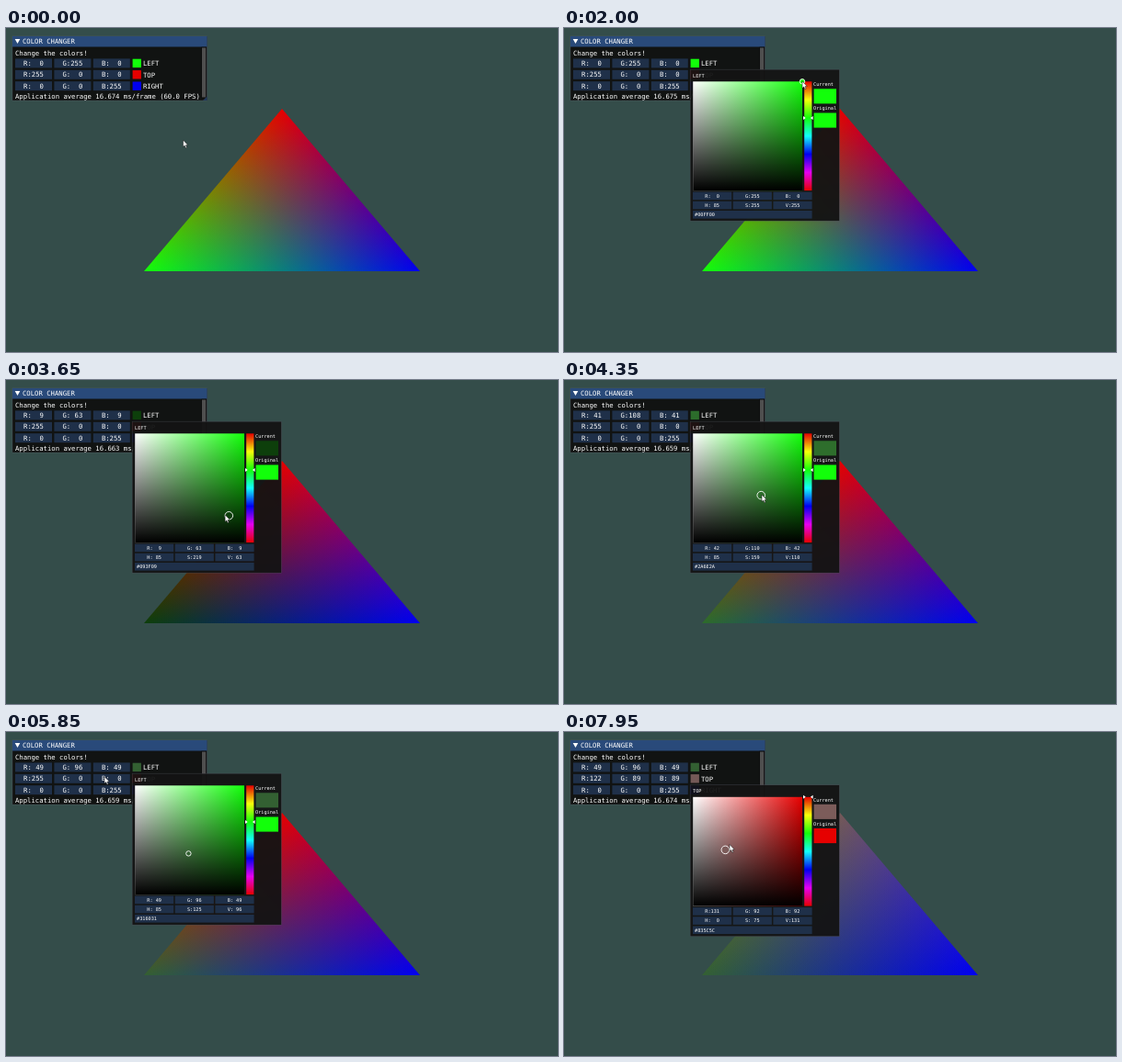
An HTML page with a canvas that plays this animation: 600x353 px, repeating every 8 s.

```html
<!DOCTYPE html>
<html lang="en">
<head>
<meta charset="utf-8">
<title>Color changer</title>
<style>
  html, body { margin: 0; width: 100%; height: 100%; overflow: hidden; background: #344d4a; }
  canvas { display: block; }
</style>
</head>
<body>
<canvas id="stage" width="600" height="353"></canvas>
<script>
const ctx = document.getElementById('stage').getContext('2d');
const LOOP = 8000;
const BIG = 7.26, SMALL = 5.22;
const FRAME_BG = '#1f3049', BORDER = 'rgba(110,110,128,.4)';
const SIDE = 118.8, SV_X = 140.2, SV_DY = 13.3;
const PICK_LAG = 75, LIST_LAG = 125;

// Pointer stops: arrival time, x, y, rest
const stops = [
  [0, 192.5, 122, 150],
  [600, 142, 39, 160],
  [1250, 211, 116.5],
  [1900, 259, 58, 600],
  [2700, 244, 69.5],
  [3100, 225, 110],
  [3450, 242.3, 147.8, 125],
  [3900, 212, 138],
  [4350, 215, 125],
  [4850, 228.7, 154.3, 120],
  [5280, 198.4, 132.4, 170],
  [5850, 107, 48.5],
  [6250, 141, 51, 200],
  [6950, 259, 70.5, 130],
  [7700, 167, 139],
  [7950, 180, 122.5]
];
const pointer = stops.flatMap(([t, x, y, rest]) => rest ? [[t, x, y], [t + rest, x, y]] : [[t, x, y]]);

const pickers = [
  { name: 'LEFT', top: 45, hue: 1 / 3, open: 720, close: 6080, press: 2500, release: 5400 },
  { name: 'TOP', top: 57.5, hue: 0, open: 6400, close: LOOP, press: 7080, release: LOOP }
];

const clamp = (v, a, b) => Math.min(b, Math.max(a, v));

// Cubic through the keys that never overshoots
function track(keys, t, axis) {
  let i = 0;
  while (i < keys.length - 2 && t >= keys[i + 1][0]) i++;
  const slope = k => (keys[k + 1][axis] - keys[k][axis]) / (keys[k + 1][0] - keys[k][0]);
  const tangent = k => {
    if (k === 0 || k === keys.length - 1) return slope(Math.min(k, keys.length - 2));
    const a = slope(k - 1), b = slope(k);
    return a * b <= 0 ? 0 : 2 * a * b / (a + b);
  };
  const [a, b] = [keys[i], keys[i + 1]];
  const span = b[0] - a[0], u = clamp((t - a[0]) / span, 0, 1), w = 1 - u;
  return a[axis] * w * w * (1 + 2 * u) + b[axis] * u * u * (3 - 2 * u)
    + span * u * w * (tangent(i) * w - tangent(i + 1) * u);
}

function colorOf(hue, s, v) {
  const part = n => {
    const k = (n + hue * 6) % 6;
    return Math.round(255 * v * (1 - s * clamp(Math.min(k, 4 - k), 0, 1)));
  };
  return [part(5), part(3), part(1)];
}

function pick(p, t) {
  let s = 1, v = 1;
  if (t > p.press) {
    const at = Math.min(t, p.release);
    s = clamp((track(pointer, at, 1) - SV_X) / SIDE, 0, 1);
    v = clamp(1 - (track(pointer, at, 2) - p.top - SV_DY) / SIDE, 0, 1);
  }
  return { s, v, rgb: colorOf(p.hue, s, v) };
}

// Slightly muted primaries
const css = ([r, g, b]) => `rgb(${r * .9 + g * .07},${g},${b * .94 + g * .04})`;

function rect(x, y, w, h, fill) {
  ctx.fillStyle = fill;
  ctx.fillRect(x, y, w, h);
}

function poly(points, fill) {
  ctx.beginPath();
  points.forEach(([x, y]) => ctx.lineTo(x, y));
  ctx.closePath();
  ctx.fillStyle = fill;
  ctx.fill();
}

function text(str, x, cy, size = BIG, align = 'left') {
  ctx.font = `${size}px "DejaVu Sans Mono", monospace`;
  ctx.textAlign = align;
  ctx.fillStyle = '#fff';
  ctx.fillText(str, x, cy + size * .36);
}

function linear(x0, y0, x1, y1, colors) {
  const g = ctx.createLinearGradient(x0, y0, x1, y1);
  colors.forEach((c, i) => g.addColorStop(i / (colors.length - 1), c));
  return g;
}

function box(x, y, w, h, fill) {
  rect(x, y, w, h, fill);
  ctx.strokeStyle = BORDER;
  ctx.lineWidth = .6;
  ctx.strokeRect(x, y, w, h);
}

function fields(letters, values, x, y, w, h, step, size) {
  values.forEach((v, i) => {
    rect(x + i * step, y, w, h, FRAME_BG);
    text(letters[i] + ':' + String(v).padStart(3), x + i * step + w / 2, y + h / 2, size, 'center');
  });
}

// Each corner fades out towards its opposite edge; the three layers add up
function drawTriangle(colors) {
  const pts = [[150, 265], [300, 88], [450, 265]];
  poly(pts, '#000');
  ctx.globalCompositeOperation = 'lighter';
  pts.forEach(([x, y], i) => {
    const [ax, ay] = pts[(i + 1) % 3], [bx, by] = pts[(i + 2) % 3];
    const dx = bx - ax, dy = by - ay;
    const k = ((x - ax) * dx + (y - ay) * dy) / (dx * dx + dy * dy);
    poly(pts, linear(x, y, ax + k * dx, ay + k * dy, [css(colors[i]), '#000']));
  });
  ctx.globalCompositeOperation = 'source-over';
}

function drawPanel(colors, ms) {
  box(7, 9, 211.5, 70, 'rgba(15,15,15,.94)');
  rect(7, 9, 211.5, 11.5, '#294a7a');
  poly([[9.7, 12], [15.3, 12], [12.5, 17]], '#fff');
  text('COLOR CHANGER', 18, 14.7);
  text('Change the colors!', 10, 27.2);
  ['LEFT', 'TOP', 'RIGHT'].forEach((name, i) => {
    const y = 33.4 + i * 12.4;
    fields('RGB', colors[i], 10, y, 40, 10, 42.4, BIG);
    rect(137.6, y + .3, 9.3, 9.4, css(colors[i]));
    text(name, 149, y + 5.2);
  });
  text(`Application average ${ms.toFixed(3)} ms/frame (${(1000 / ms).toFixed(1)} FPS)`, 10, 74.5);
  rect(212.5, 20.5, 5.5, 56, 'rgba(5,5,5,.53)');
  rect(213, 21.5, 4.2, 54, '#4f4f4f');
  poly([[218.5, 74.5], [218.5, 79], [214, 79]], '#22395a');
}

function drawPicker(p, t) {
  const { s, v, rgb } = pick(p, t - PICK_LAG);
  const pure = css(colorOf(p.hue, 1, 1));
  const top = p.top, y = top + SV_DY;

  box(137.2, top + .2, 162.2, 165, 'rgba(20,19,20,.95)');
  text(p.name, 140, top + 6.7, SMALL);

  rect(SV_X, y, SIDE, SIDE, linear(SV_X, 0, SV_X + SIDE, 0, ['#fff', pure]));
  rect(SV_X, y, SIDE, SIDE, linear(0, y, 0, y + SIDE, ['rgba(0,0,0,0)', '#000']));
  const hues = Array.from({ length: 7 }, (_, i) => css(colorOf(i / 6, 1, 1)));
  rect(261.2, y, 8.2, SIDE, linear(0, y, 0, y + SIDE, hues));
  const hy = y + p.hue * SIDE;
  poly([[260, hy - 2], [262.7, hy], [260, hy + 2]], '#fff');
  poly([[270.6, hy - 2], [267.9, hy], [270.6, hy + 2]], '#fff');

  [['Current', css(rgb)], ['Original', pure]].forEach(([label, fill], i) => {
    text(label, 271, top + 16.4 + i * 26.2, SMALL);
    rect(271.6, top + 21.3 + i * 26.2, 24.4, 16.1, fill);
  });

  const hsv = [p.hue, s, v].map(n => Math.round(n * 255));
  fields('RGB', rgb, 140, top + 133.6, 42.2, 8.6, 43.7, SMALL);
  fields('HSV', hsv, 140, top + 143.8, 42.2, 8.6, 43.7, SMALL);
  rect(140, top + 154, 129.6, 8.6, FRAME_BG);
  const hex = rgb.map(n => n.toString(16).padStart(2, '0')).join('').toUpperCase();
  text('#' + hex, 142, top + 158.3, SMALL);

  const dragging = t >= p.press && t < p.release + PICK_LAG;
  ctx.beginPath();
  ctx.arc(SV_X + s * SIDE, y + (1 - v) * SIDE, dragging ? 4.3 : 2.7, 0, 7);
  ctx.fillStyle = css(rgb);
  ctx.fill();
  ctx.strokeStyle = '#fff';
  ctx.lineWidth = .9;
  ctx.stroke();
}

function drawPointer(x, y) {
  const shape = [[0, 0], [0, 7.6], [1.7, 6.1], [2.9, 8.8], [4.1, 8.2], [3, 5.7], [5.2, 5.5]];
  poly(shape.map(([dx, dy]) => [x + dx, y + dy]), '#fff');
  ctx.strokeStyle = '#111';
  ctx.lineWidth = .5;
  ctx.stroke();
}

function draw(t) {
  const colors = [...pickers.map(p => pick(p, t - LIST_LAG).rgb), [0, 0, 255]];
  const frameTime = 16.6675 + .0105 * Math.sin((t + 900) / LOOP * 2 * Math.PI);
  rect(0, 0, 600, 353, '#344d4a');
  drawTriangle(colors);
  drawPanel(colors, frameTime);
  pickers.filter(p => t >= p.open && t < p.close).forEach(p => drawPicker(p, t));
  drawPointer(track(pointer, t, 1), track(pointer, t, 2));
}

const start = performance.now();
function tick() {
  draw((performance.now() - start) % LOOP);
  requestAnimationFrame(tick);
}
tick();
</script>
</body>
</html>
```
